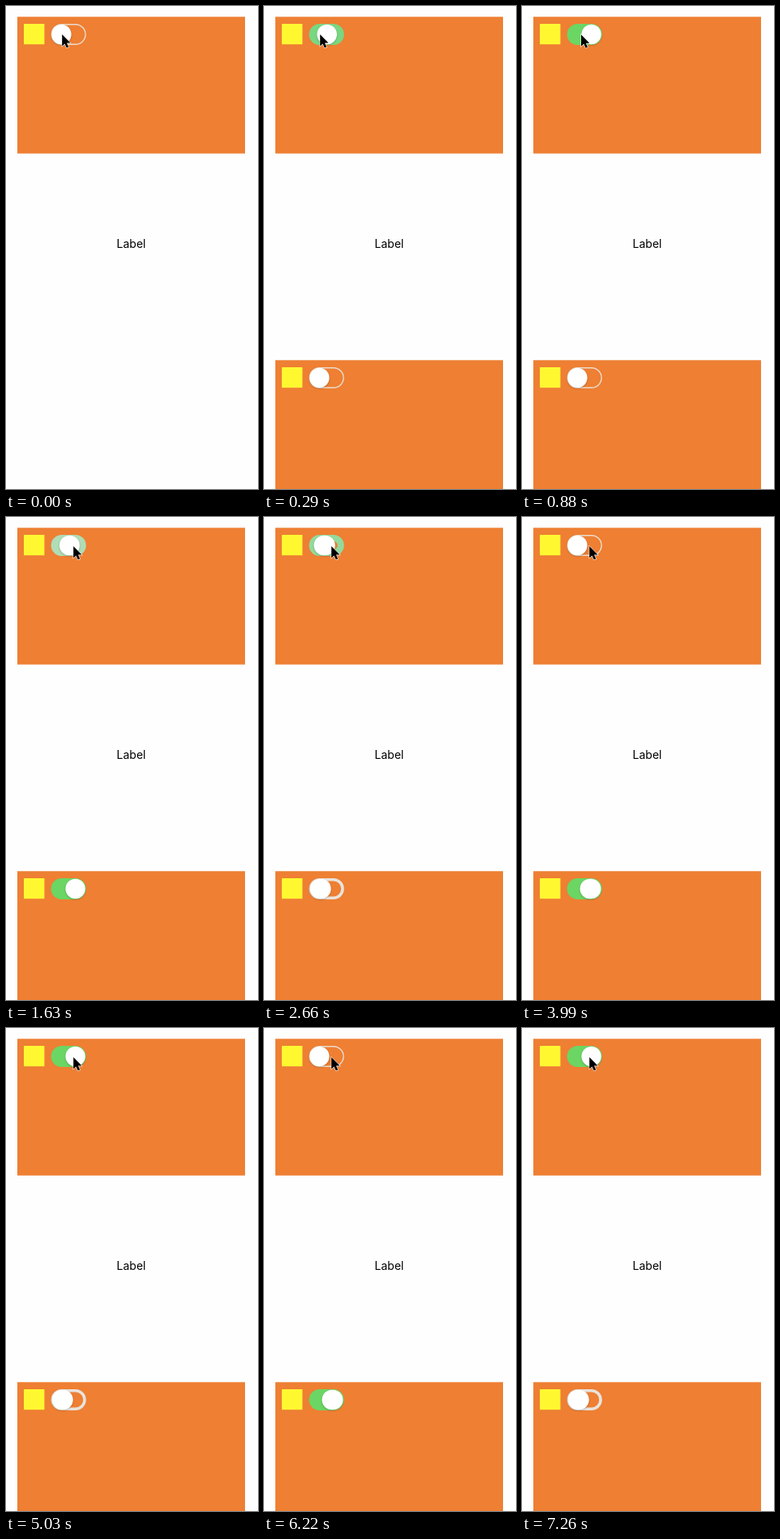
An HTML page that plays this animation: 311x595 px, repeating every 8000 ms.

```html
<!DOCTYPE html>
<html lang="en">
<head>
<meta charset="utf-8">
<title>Switch snapshots</title>
<style>
  html, body { margin: 0; width: 100%; height: 100%; overflow: hidden; background: #fefefe; }
  svg { display: block; width: 311px; height: 595px; }
  text { font: 14px Inter, sans-serif; text-anchor: middle; }
  .thumb { filter: drop-shadow(0 1.2px 1px rgba(0, 0, 0, .22)); }
</style>
</head>
<body>
<svg viewBox="0 0 311 595">
  <defs>
    <g id="panel">
      <rect x="14" y="13.3" width="281" height="168.4" fill="#ee7f33"/>
      <rect x="22" y="22" width="25.4" height="25.2" fill="#fff831"/>
    </g>
  </defs>
  <use href="#panel"/>
  <g id="live"></g>
  <text x="154.5" y="297.8">Label</text>
  <g id="copy" transform="translate(0 423)">
    <use href="#panel"/>
  </g>
  <path id="cursor" d="M0 0V14.5L3.3 11.4 5.6 16.6 8 15.6 5.8 10.6H10.3Z"
        fill="#000" stroke="#fff" stroke-width="1.1" paint-order="stroke"/>
</svg>
<script>
const LOOP = 8000;
const TRACK = { x: 55.6, y: 22, w: 43.2, h: 26 };

// A pose is [thumb centre, thumb width, border width, track colour].
const OFF = [68.4, 24.4, 1.4, '#ecdccb'];
const OFF_LEAVING = [69.7, 26, 3.6, '#e9e3dc'];
const ON = [85.6, 24.4, 13, '#6bd663'];
const ON_LEAVING = [84.5, 26, 13, '#6bd663'];
const ON_SETTLING = [84.9, 25, 13, '#6dd768'];
const turnOn = first => [first, ON_SETTLING, ON, ON];
const turnOff = [
  [78.4, 25, 13, '#b0dcb6'],
  [70, 26, 4.5, '#e7e2da'],
  [68.5, 24.6, 2, '#eaddcf'],
  OFF
];
const firstOn = turnOn([77.7, 24.6, 13, '#79d782']);
const laterOn = turnOn([74.7, 26.2, 8, '#93da9c']);

// Each tap: start time, live switch steps, frozen copy taken at the tap.
const taps = [
  [290, firstOn, OFF],
  [1630, turnOff, ON],
  [2660, laterOn, OFF_LEAVING],
  [3540, turnOff, ON_LEAVING],
  [4590, laterOn, OFF_LEAVING],
  [5770, turnOff, ON_LEAVING],
  [6820, laterOn, OFF_LEAVING]
];
const STEPS = [0, 150, 300, 440];
const cursorMoves = [[0, 69.2, 35], [740, 73, 35.2], [890, 79, 35.6], [1030, 83.2, 36]];

const byId = id => document.getElementById(id);

function addShape(parent, attrs) {
  const shape = document.createElementNS('http://www.w3.org/2000/svg', 'rect');
  setAttrs(shape, attrs);
  parent.append(shape);
  return shape;
}

function setAttrs(node, attrs) {
  for (const name in attrs) node.setAttribute(name, attrs[name]);
}

function makeSwitch(parent) {
  const track = addShape(parent, { fill: 'none' });
  const thumb = addShape(parent, { class: 'thumb', y: 22.8, height: 24.4, rx: 12.2, fill: '#fff' });
  return ([x, width, border, colour]) => {
    setAttrs(track, {
      x: TRACK.x + border / 2, y: TRACK.y + border / 2,
      width: TRACK.w - border, height: TRACK.h - border,
      rx: (TRACK.h - border) / 2, stroke: colour, 'stroke-width': border
    });
    setAttrs(thumb, { x: x - width / 2, width });
  };
}

const drawLive = makeSwitch(byId('live'));
const drawCopy = makeSwitch(byId('copy'));
const started = performance.now();

function draw(now) {
  const time = Math.max(0, now - started) % LOOP;
  const tap = taps.findLast(([start]) => start <= time);
  byId('copy').style.display = tap ? '' : 'none';
  if (tap) {
    const [start, poses, frozen] = tap;
    drawLive(poses[STEPS.findLastIndex(step => step <= time - start)]);
    drawCopy(frozen);
  } else {
    drawLive(OFF);
  }
  const [, x, y] = cursorMoves.findLast(([start]) => start <= time);
  byId('cursor').setAttribute('transform', `translate(${x} ${y})`);
  requestAnimationFrame(draw);
}
draw(started);
</script>
</body>
</html>
```
